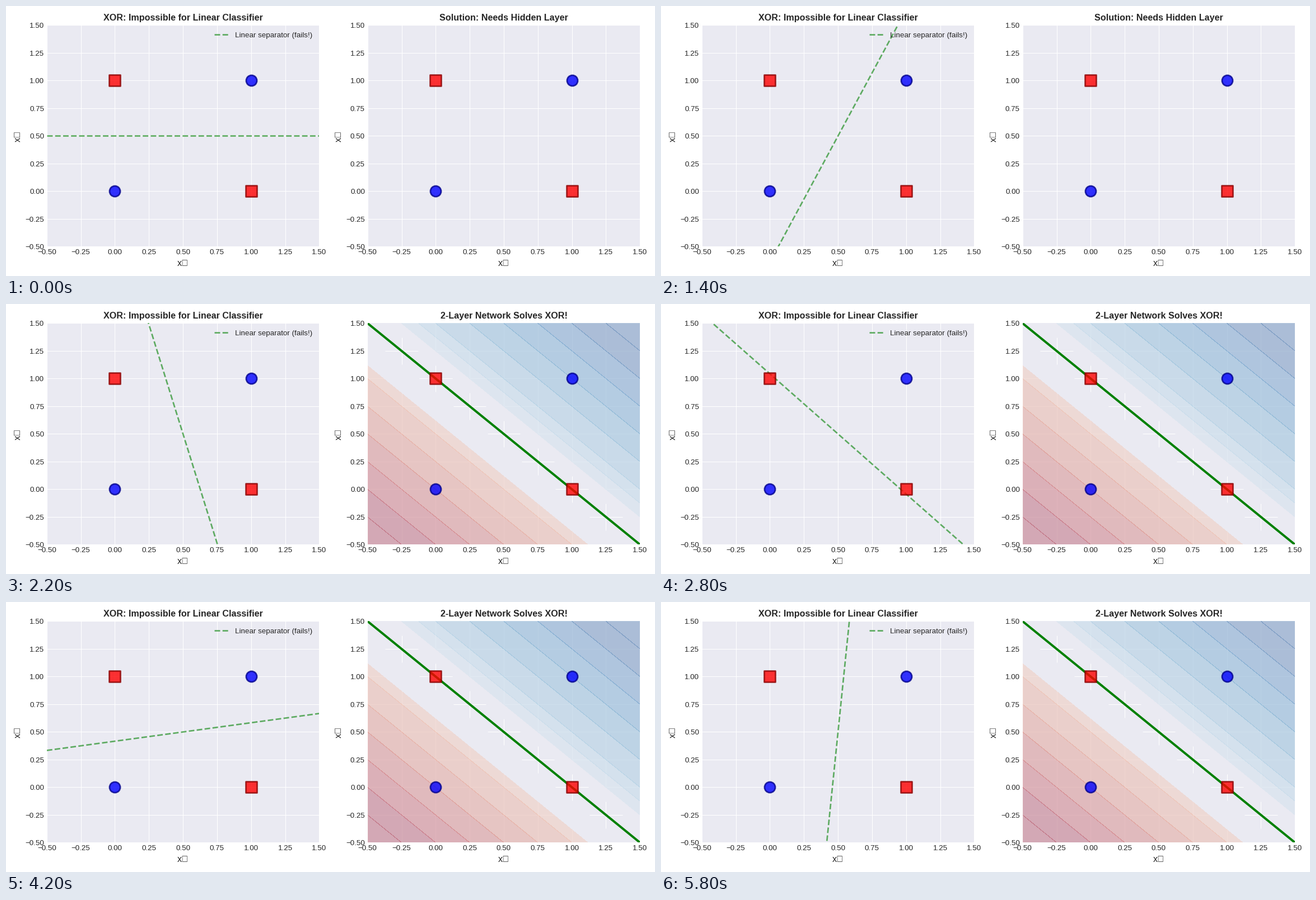
A matplotlib script for the animation above (6 s loop, 1159x483 px).

```python
import numpy as np
import matplotlib.pyplot as plt
from matplotlib.animation import FuncAnimation

plt.style.use("seaborn-v0_8-darkgrid")
plt.rcParams["font.family"] = "Liberation Sans"

DPI = 96.61
W, H = 1159, 483
FRAMES, INTERVAL = 30, 200
SOLVED_AFTER = 10
BACK = "#EAEAF2"
MISSING = "x\ue123"  # subscript without a glyph, shown as an empty box

fig = plt.figure(figsize=(12, 5), dpi=DPI, facecolor="white")


def panel(left, title):
    ax = fig.add_axes([left / W, 52.5 / H, 486.5 / W, 396 / H])
    ax.set(xlim=(-0.5, 1.5), ylim=(-0.5, 1.5))
    ax.set_facecolor(BACK)
    ax.set_xlabel(MISSING, fontsize=12)
    ax.set_ylabel(MISSING, fontsize=12)
    ax.set_title(title, fontsize=12, fontweight="bold")
    # The size makes the squares snap to 20 pixels.
    points = dict(s=204, alpha=0.8, linewidths=2, zorder=5)
    ax.scatter([0, 1], [0, 1], c="blue", marker="o", edgecolors="darkblue", **points)
    ax.scatter([0, 1], [1, 0], c="red", marker="s", edgecolors="darkred", **points)
    return ax


def network(x, y):
    """Two ReLU units, one subtracted from the other."""
    s = x + y
    return np.maximum(0, s - 0.5) - np.maximum(0, 1.5 - s)


def band_color(i):
    if 7 <= i < 12:
        return (234 / 255, 234 / 255, 242 / 255, 1)
    return plt.cm.RdBu((np.clip(i, 1, 18) + 0.5) / 20)[:3] + (0.3,)


left = panel(72.8, "XOR: Impossible for Linear Classifier")
right = panel(645.5, "")

xs = np.linspace(-0.5, 1.5, 100)
separator, = left.plot(xs, xs, "--", color="green", lw=2, alpha=0.6,
                       label="Linear separator (fails!)")
left.legend(loc="upper right", fontsize=10)

gx, gy = np.meshgrid(np.linspace(-0.5, 1.5, 201), np.linspace(-0.5, 1.5, 201))
gz = network(gx, gy)
solution = [
    right.contourf(gx, gy, gz, levels=np.linspace(-2.5, 2.5, 21),
                   colors=[band_color(i) for i in range(20)]),
    right.contour(gx, gy, gz, levels=[0], colors="green", linewidths=3),
]
# The grid shows at full strength only close to the boundary.
near = np.array([-0.12, 0.12])
for v in np.arange(-0.25, 1.5, 0.25):
    for px, py in ((v + near, [1 - v] * 2), ([v] * 2, 1 - v + near)):
        solution += right.plot(px, py, color="white", lw=0.8, zorder=1.5,
                               solid_capstyle="butt")

angles = np.linspace(0, np.pi, 20)


def update(frame):
    slope = np.tan(angles[frame % len(angles)])
    separator.set_ydata(0.5 + slope * (xs - 0.5))
    solved = frame > SOLVED_AFTER
    for artist in solution:
        artist.set_visible(solved)
    right.grid(True, alpha=0.4 if solved else 1)
    right.title.set_text("2-Layer Network Solves XOR!" if solved
                         else "Solution: Needs Hidden Layer")
    return []


anim = FuncAnimation(fig, update, frames=FRAMES, interval=INTERVAL,
                     init_func=lambda: update(0), repeat=True, repeat_delay=0)
plt.show()
```
